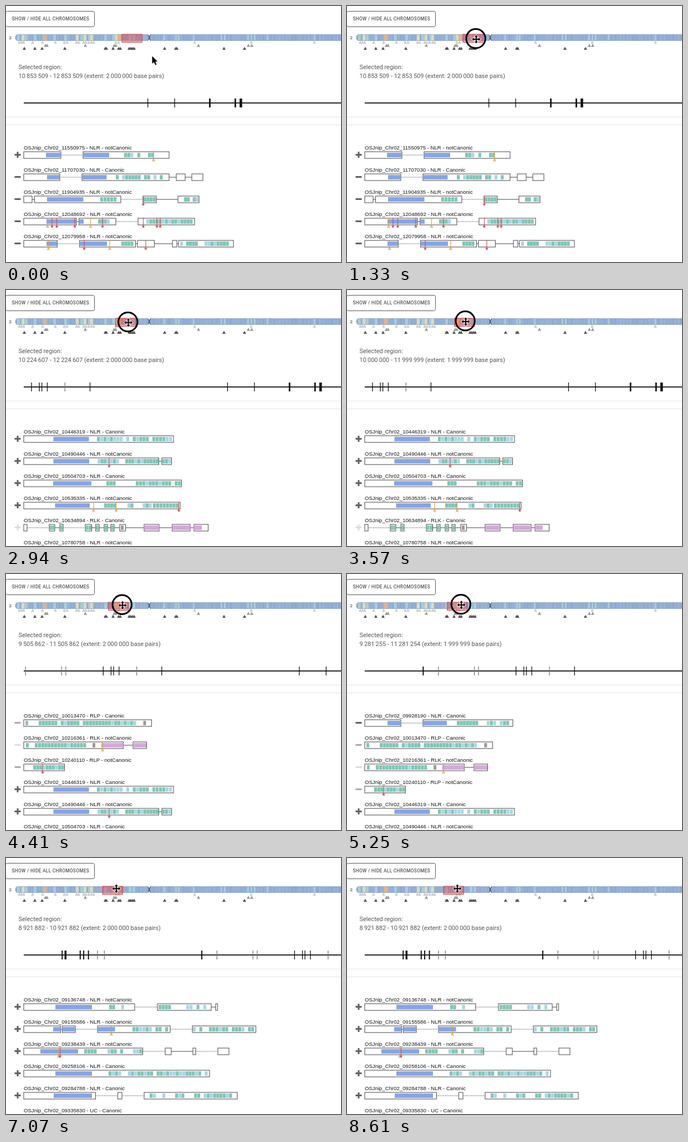
Animation, 604 px wide and 462 px high, one loop 8680 ms. Source, as an HTML page:

```html
<!DOCTYPE html>
<html lang="en">
<head>
<meta charset="utf-8">
<title>Chromosome browser</title>
<style>
html, body { margin: 0; height: 100%; overflow: hidden; background: #fff; }
svg { display: block; }
text { white-space: pre; }
.ui { font: 11px Roboto, sans-serif; fill: #555; }
.label { font: 9.58px "Liberation Sans", Arial, sans-serif; fill: #151515; }
</style>
</head>
<body>
<svg id="stage" width="604" height="462" viewBox="0 0 604 462"></svg>
<script>
const LOOP = 8680, TICK = 70;
const START = 10853509, EXTENT = 1999999.8;
const STEP = 44921.5515;      // base pairs per dragged pixel
const stage = document.getElementById('stage');

function el(parent, tag, attrs, text) {
  const node = document.createElementNS('http://www.w3.org/2000/svg', tag);
  for (const k in attrs) node.setAttribute(k, attrs[k]);
  if (text) node.textContent = text;
  return parent.appendChild(node);
}
const rect = (p, x, y, width, height, fill, more) => el(p, 'rect', { x, y, width, height, fill, ...more });
const path = (p, d, more) => el(p, 'path', { d, ...more });
let seed = 7;
const rnd = () => (seed = seed * 16807 % 2147483647) / 2147483647;

// Button and fixed text
rect(stage, -0.5, 9.5, 160, 28, '#fff', { rx: 3, stroke: '#555' });
el(stage, 'text', { x: 10.5, y: 26, class: 'ui', style: 'font-size:8.25px;font-weight:500;letter-spacing:.335px' },
  'SHOW / HIDE ALL CHROMOSOMES');
el(stage, 'text', { x: 5.5, y: 59.5, class: 'ui', style: 'font-size:8px;fill:#222' }, '2');
el(stage, 'text', { x: 22.5, y: 114, class: 'ui' }, 'Selected region:');
const range = el(stage, 'text', { x: 22.5, y: 130, class: 'ui', style: 'letter-spacing:-.022px' });
for (const y of [200, 214]) rect(stage, 0, y, 604, 1, '#e6e6e6');

// Chromosome bar with its two arms
const ARMS = 'M610 51.5H261Q258 53 258 57Q258 61 261 62.5H610M255 51.5Q258 53 258 57Q258 61 255 62.5H22Q17 62.5 17 57T22 51.5Z';
path(el(stage, 'clipPath', { id: 'arms' }), ARMS);
const bar = el(stage, 'g', { 'clip-path': 'url(#arms)' });
for (let x = 17; x < 604; x += 2.36) {
  rect(bar, x, 51, 2.4, 12, '#a6bddd');
  rect(bar, x, 51, 1.9, 12, `hsl(216 45% ${67 + rnd() * 4}%)`);
}
const bands = (fill, width, ...xs) => xs.forEach(x => rect(bar, x, 51, width, 12, fill));
bands('#a5cfd8', 5, 20, 34, 50, 85, 105, 134, 148, 177, 192, 221, 228);
bands('#a5cfd8', 3, 284, 305, 310, 337, 387, 393, 435, 441, 447, 470, 555);
bands('#dfdcb4', 5, 28, 126, 140, 152, 197);
bands('#eeb173', 6, 67, 201);
path(stage, ARMS, { fill: 'none', stroke: '#8799b5', 'stroke-width': 0.6 });
path(stage, 'M256 51.5Q260 57 256 62.5M260.5 51.5Q256.5 57 260.5 62.5', { fill: 'none', stroke: '#333', 'stroke-width': 0.9 });

// Gene markers below the bar
const marks = (y, fill, ...xs) => xs.forEach(x => path(stage, `M${x - 3} ${y + 2.7}h6l-3 -5.6z`, { fill }));
marks(65.3, '#ccc', 24, 28, 32, 48, 66, 89, 105, 110, 127, 131, 140, 144, 149, 154, 158, 198, 203, 340, 442, 556);
marks(71, '#999', 71, 74, 143, 195, 198, 347, 437, 443);
marks(76.3, '#555', 33, 52, 65, 106, 179, 181, 193, 203, 206, 222, 225, 228, 231, 286, 306, 308, 393, 430);

const brush = rect(stage, 209, 51, 36.2, 14.5, '#e04545', { 'fill-opacity': 0.43, stroke: '#d04048' });

// Region axis and gene list
rect(stage, 32, 174.1, 572, 1.8, '#111');
const axis = el(stage, 'g', {});
const list = el(stage, 'g', {});
const genes = [];
const KIND = { NLR: '#5f5f5f', RLP: '#aaa', RLK: '#ddd', UC: '#111' };
const BLUE = '#86a5e8', TEAL = '#7cc7b7', CYAN = '#a6d8e5', VIOLET = '#d8a6df', GRAY = '#999';
const STAR = 'l.8 2.3h2.4l-1.9 1.5l.7 2.4l-2 -1.4l-2 1.4l.7 -2.4l-1.9 -1.5h2.4z';

// exons: from, to, from, to ...; domains are spans cut to the exons;
// repeats: [from, to, share of filled slots]
function gene(pos, kind, canonic, strand, exons, { blue, violet, gray, repeats = [], shift = [], stop = [], width = 1.3 }) {
  const g = el(list, 'g', {});
  const name = `OSJnip_Chr02_${String(pos).padStart(8, '0')} - ${kind} - ${canonic ? 'Canonic' : 'notCanonic'}`;
  el(g, 'text', { x: 32, y: 259, class: 'label' }, name);
  path(g, 'M15.5 268.5h11' + (strand == '+' ? 'M21 263v11' : ''), { stroke: KIND[kind], 'stroke-width': 3 });

  const cut = ([from, to], fn) => {
    for (let i = 0; i < exons.length; i += 2) {
      const a = Math.max(from, exons[i]), b = Math.min(to, exons[i + 1]);
      if (a < b) fn(a, b);
    }
  };
  const domain = (span, fill) => span && cut(span, (a, b) => rect(g, a, 265, b - a, 8, fill));

  for (let i = 1; i < exons.length - 1; i += 2) {
    const long = exons[i + 1] - exons[i] > 39.5;
    path(g, `M${exons[i]} 269H${exons[i + 1]}`, { stroke: '#444', 'stroke-dasharray': long ? '1.5 1.5' : 'none' });
  }
  cut([0, 604], (a, b) => rect(g, a, 263, b - a, 12, '#fff', { stroke: '#555', 'stroke-width': 1.1 }));
  domain(blue, BLUE);
  domain(violet, VIOLET);
  domain(gray && [gray, gray + 5], GRAY);

  seed = pos;
  for (const [from, to, share] of repeats) cut([from, to], (a, b) => {
    const slots = Math.max(1, Math.round((b - a) / 5.7)), pitch = (b - a) / slots;
    for (let i = 0; i < slots; i++) {
      const edge = i == 0 || i == slots - 1;
      const fill = rnd() < 0.9 * (1.1 - share) ? CYAN : TEAL;
      if (rnd() < share || edge) rect(g, a + i * pitch, 265, Math.min(5.2, pitch), 8, fill);
    }
  });
  for (const x of shift)
    path(g, `M${x} 262.5V277M${x - 2} 280.5l2 -5l2 5M${x - 1.5} 279h3`, { fill: 'none', stroke: '#e0a040', 'stroke-width': 1.2 });
  for (const x of stop) {
    path(g, `M${x} 262.5V276`, { stroke: '#cf4a55', 'stroke-width': 1.1 });
    path(g, `M${x} 274.5${STAR}`, { fill: '#cf4a55' });
  }
  const left = (strand == '-' ? -1.5 : 0) - width / 2;
  const mark = rect(axis, left, 167, width, 16, kind == 'NLR' ? '#111' : '#777');
  genes.push({ pos, g, mark });
}

gene(9136748, 'NLR', 0, '+', [32, 232, 273, 370, 378, 381.5],
  { blue: [89, 155], repeats: [[186, 213, 0.8], [275, 298, 0.8], [325, 362, 0.6]], width: 2 });
gene(9155586, 'NLR', 0, '+', [32, 98.5, 101.5, 125, 165, 296, 336, 450.5],
  { blue: [85, 196.5], repeats: [[228, 293, 0.8], [337, 448, 0.7]], shift: [190], width: 3.5 });
gene(9238439, 'NLR', 0, '+', [32, 246.5, 287, 298, 337, 342, 382, 402],
  { blue: [62, 130], repeats: [[141, 164, 0.9], [183, 246, 0.5]], shift: [95], stop: [97.5], width: 2 });
gene(9258106, 'NLR', 1, '+', [32, 367], { blue: [89, 155], repeats: [[185, 364, 0.75]], width: 2 });
gene(9284788, 'NLR', 1, '+', [32, 161.5, 201.5, 209, 249, 417], { blue: [86, 155], repeats: [[259, 408, 0.6]], width: 2 });
gene(9335830, 'UC', 1, '+', [32, 70, 110, 138], { repeats: [[112, 129, 1]] });
gene(9374342, 'UC', 1, '+', [32, 70, 110, 138], {});
gene(9928190, 'NLR', 1, '-', [32, 97, 137, 299], { blue: [73, 180], repeats: [[198, 237, 0.9], [252, 293, 0.6]], width: 2 });
gene(10013470, 'RLP', 1, '-', [32, 262.5], { gray: 247.5, repeats: [[35, 40, 1], [59, 235, 0.97]] });
gene(10216361, 'RLK', 0, '-', [32, 211.5, 229, 253.5],
  { violet: [171.5, 253], gray: 156, repeats: [[36, 41, 1], [52, 145, 1]], shift: [174] });
gene(10240110, 'RLP', 0, '-', [32, 105.5], { repeats: [[49, 105, 1]], stop: [66] });
gene(10446319, 'NLR', 1, '+', [32, 302], { blue: [85.5, 149.5], repeats: [[164, 258, 0.65], [264, 300, 1]] });
gene(10490446, 'NLR', 0, '+', [32, 275.5, 281, 298.5],
  { blue: [85.5, 150], repeats: [[165, 204, 0.8], [215, 298, 0.95]], stop: [186] });
gene(10504703, 'NLR', 1, '+', [32, 316.5], { blue: [85, 154], repeats: [[181, 198, 1], [234, 316, 0.9]] });
gene(10535335, 'NLR', 0, '+', [32, 314],
  { blue: [88.5, 151], repeats: [[177, 199, 0.9], [219, 263, 0.7], [265, 312, 1]], shift: [158, 198.5], stop: [311.5] });
gene(10634894, 'RLK', 1, '+',
  [32, 38, 78, 88, 97, 103, 143, 154.5, 161.5, 168, 177, 183, 189, 195, 205, 215.5, 249, 276, 299.5, 332, 339, 364.5],
  { violet: [249.5, 353], gray: 207, repeats: [[79, 195, 1]] });
gene(10780758, 'NLR', 0, '-', [32, 99.5, 139.5, 296],
  { blue: [79, 184], gray: 269, repeats: [[201, 233, 0.9], [235, 258, 0.6], [286, 291, 1]], shift: [81], stop: [212] });
gene(11550975, 'NLR', 0, '+', [32, 99, 139, 294],
  { blue: [72, 186], repeats: [[213, 230, 1], [237, 242, 1], [256, 267, 0.4]], shift: [266] });
gene(11707030, 'NLR', 1, '-', [32, 97, 137, 294, 307, 323, 335, 355], { blue: [74, 181.5], repeats: [[198, 283, 0.85]] });
gene(11904935, 'NLR', 0, '-', [32, 47, 51.5, 207, 247, 271, 310, 348],
  { blue: [74, 139.5], repeats: [[170, 200, 1], [248, 270, 0.8], [321, 347, 0.9]], stop: [247.5], width: 2.8 });
gene(12048692, 'NLR', 0, '-', [32, 127, 131.5, 198, 238, 340],
  { blue: [73, 140], repeats: [[166, 187, 0.9], [253, 337, 0.9]], shift: [75, 152.5], stop: [83, 91.5, 124, 174, 247.5, 272, 278], width: 2.8 });
gene(12079958, 'NLR', 0, '-', [32, 92.5, 132.5, 233.5, 237, 267.5, 300, 308, 311, 410],
  { blue: [73, 182], repeats: [[208, 230, 1], [314, 346, 0.8], [358, 402, 0.95]], shift: [76.5, 187], stop: [141, 252], width: 4.6 });

// Pointers
const ring = el(stage, 'circle', { r: 17.2, fill: 'none', stroke: '#000', 'stroke-width': 3 });
const outline = { stroke: '#fff', 'stroke-width': 1.6, 'paint-order': 'stroke', 'stroke-linejoin': 'round' };
const arrow = path(stage, 'M0 0V13.5L3.2 10.7L5.7 16L8 15L5.6 9.8H9.8Z', outline);
const move = path(stage, 'M0 -7.6l3 3.4h-2v3.2h3.2v-2l3.4 3l-3.4 3v-2h-3.2v3.2h2l-3 3.4l-3 -3.4h2v-3.2h-3.2v2l-3.4 -3l3.4 -3v2h3.2v-3.2h-2z', outline);

// Keys start with their time; the gene view redraws late and in jumps
const pointer = [[70, 263.5, 90.5], [840, 233, 60], [1470, 233, 60], [2520, 225, 60], [3570, 214, 57], [6370, 201, 55], [6650, 199, 55.3]];
const drag = [[1470, 0], [2520, 11], [3570, 19], [4550, 32], [5250, 35], [6370, 39], [6440, 43]];
const redraw = [[0, 0], [2030, 4], [2870, 10], [3850, 19], [4480, 28], [5740, 35], [6300, 38], [6510, 43]];

function at(keys, t, i = 1) {
  const next = keys.findIndex(k => t <= k[0]);
  if (next == 0) return keys[0][i];
  if (next < 0) return keys[keys.length - 1][i];
  const a = keys[next - 1], b = keys[next];
  return a[i] + (b[i] - a[i]) * (t - a[0]) / (b[0] - a[0]);
}
const digits = v => String(v).replace(/\B(?=(\d{3})+$)/g, '\u2009');
const place = (node, x, y) => node.setAttribute('transform', `translate(${x} ${y})`);
const show = (node, on) => node.setAttribute('display', on ? 'inline' : 'none');

function view(from) {
  let row = 0;
  for (const { pos, g, mark } of genes) {
    const on = pos > from;
    show(mark, on);
    show(g, on && row < 6);
    if (!on) continue;
    place(mark, 32.5 + (pos - from) * 0.00032, 0);
    place(g, 0, 40 * row++);
  }
}

function frame(now) {
  const t = Math.floor(now % LOOP / TICK) * TICK;
  const n = Math.round(at(drag, t));
  const from = Math.round(START - n * STEP), to = Math.round(START + EXTENT - n * STEP);
  range.textContent = `${digits(from)} - ${digits(to)} (extent: ${digits(to - from)} base pairs)`;
  brush.setAttribute('x', 209 - n * 0.8137);
  view(START - STEP * redraw.findLast(r => r[0] <= t)[1]);

  const x = at(pointer, t), y = at(pointer, t, 2);
  const inside = x < 245 && y < 66;
  show(arrow, !inside);
  show(move, inside);
  show(ring, t >= 980 && t < 6720);
  place(arrow, x, y);
  place(move, x, y);
  place(ring, x - 0.8, y - 1.2);
  requestAnimationFrame(frame);
}
frame(0);
</script>
</body>
</html>
```
